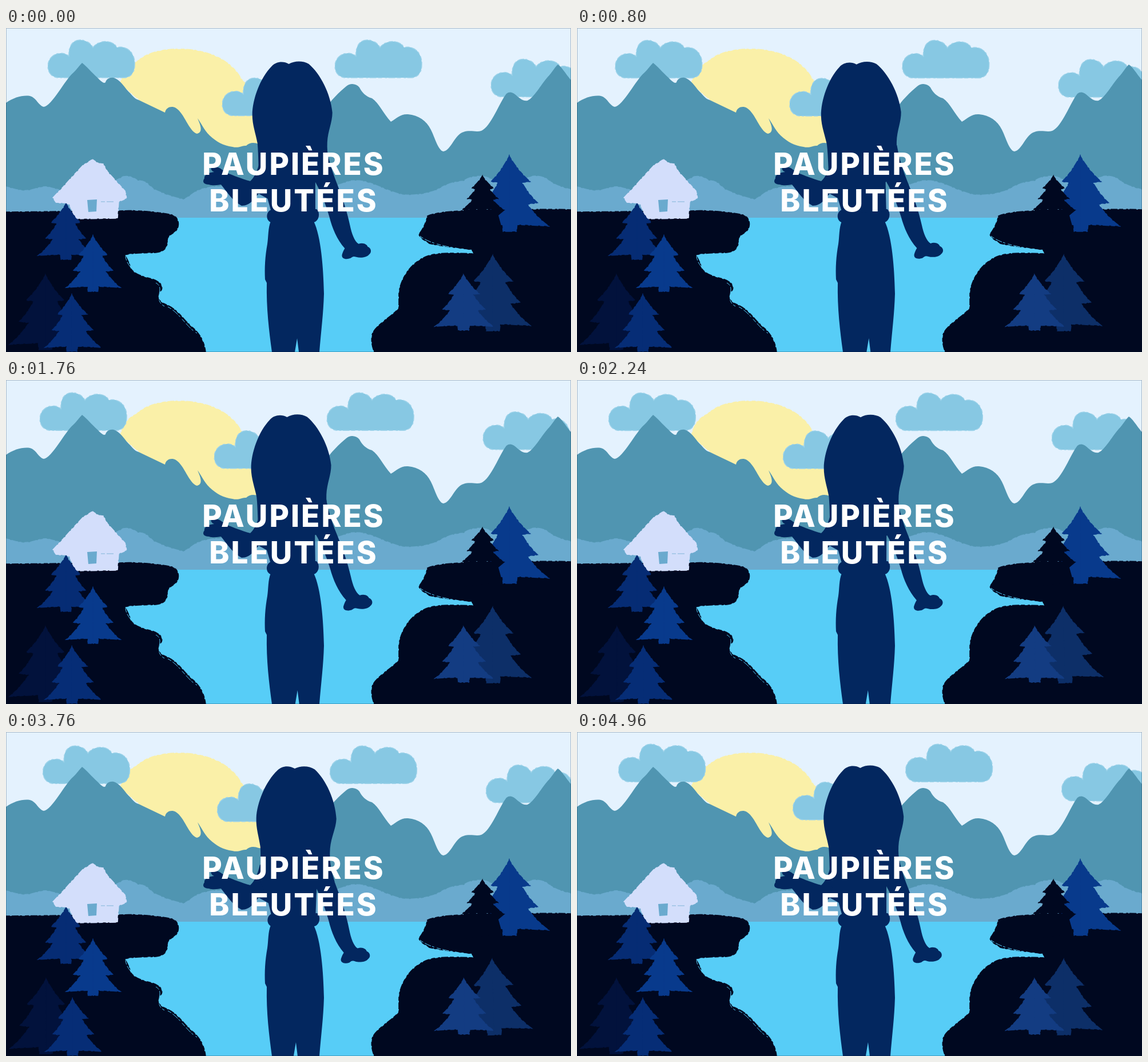
An HTML page with a canvas that plays this animation: 988x567 px, repeating every 5.04 s.

```html
<!DOCTYPE html>
<html lang="fr">
<head>
<meta charset="utf-8">
<title>Paupières bleutées</title>
<style>
html, body { margin: 0; width: 100%; height: 100%; overflow: hidden; background: #e4f2fe; }
canvas { display: block; }
</style>
</head>
<body>
<canvas id="stage" width="988" height="567"></canvas>
<script>
const ctx = document.getElementById('stage').getContext('2d');
const W = 988, H = 567, LOOP = 5040, STEP = 80, TAU = Math.PI * 2;

const color = {
  sky: '#e4f2fe', sun: '#faf0a8', cloud: '#87c8e3', cloudEdge: '#9dd3ea',
  mountain: '#5095b1', shore: '#6aaace', lake: '#57cdf7', land: '#000820',
  house: '#d3defb', woman: '#03275f'
};

const sun = new Path2D('M200 98C203 82 212 66 228 60C242 45 270 37 300 37C330 36 358 44 374 53C391 62 405 76 411 89C430 105 446 140 446 212L340 215Z');

const mountains = new Path2D(
  'M0 131C14 121 30 117 42 119C53 122 57 136 66 138C80 137 104 89 118 78' +
  'C124 72 129 65 133 61C140 66 150 78 160 87C166 93 171 98 174 95C176 87 185 85 191 88' +
  'C203 94 208 106 217 114C224 122 226 124 232 126L278 148C280 138 290 136 297 140' +
  'C312 149 320 181 334 185C346 182 339 168 335 158C341 166 346 178 356 188' +
  'C368 199 380 206 396 208C408 211 412 205 420 206C426 200 434 200 442 203L500 210' +
  'L556 145C567 127 584 111 595 102C602 96 612 97 618 104C622 112 629 120 640 123' +
  'C652 131 660 150 673 164C683 158 690 150 703 151C722 153 735 162 743 178' +
  'C750 192 756 215 765 216C778 214 785 186 800 182C812 178 822 183 831 180' +
  'C848 173 863 130 875 115C880 111 885 112 890 116C896 121 904 129 912 127' +
  'C923 122 935 100 947 86C955 78 960 68 965 64C972 68 982 85 988 91V334H0Z');

const shore = new Path2D(
  'M0 278C14 281 24 286 40 284C55 282 64 274 80 280C115 290 160 285 205 260' +
  'C216 258 224 262 230 267C244 266 250 275 258 282C274 290 295 297 310 300' +
  'C322 296 330 284 346 281C390 270 430 284 480 285C530 287 565 282 600 268' +
  'C632 262 654 282 690 291C715 295 738 289 752 284C768 275 780 269 800 268' +
  'C812 258 838 256 850 266C875 275 904 267 915 261C927 256 945 261 952 269' +
  'C964 277 974 279 988 283V336H0Z');

const leftLand = new Path2D(
  'M0 322L200 320C230 318 278 323 293 328C304 334 304 350 295 357' +
  'C288 362 282 364 282 372C283 388 272 392 262 393C245 394 225 393 208 397' +
  'C212 405 216 411 217 418C222 432 245 436 258 440C272 445 277 455 269 462' +
  'C261 472 270 480 280 484C300 492 310 510 325 523C340 535 347 550 349 567H0Z');

const rightLand = new Path2D(
  'M988 318C950 316 910 318 870 319C830 320 765 317 737 329C733 344 729 352 722 361' +
  'C725 370 735 372 740 377C755 381 790 385 815 388L817 395C790 394 757 392 737 399' +
  'C707 410 689 440 687 465V490C675 505 645 520 640 537C638 550 641 560 644 567H988Z');

const bristles = new Path2D(
  'M209 400C212 420 232 432 250 436M262 446C280 456 255 474 277 487M283 488C302 497 318 526 334 534' +
  'M724 364C738 376 770 384 814 389');

const house = new Path2D(
  'M151 230L162 237L170 238L178 252L188 263L208 285L211 298L197 304L195 333L122 334' +
  'C117 326 115 318 111 309L105 306L88 306L82 297L100 278L118 258L135 240Z');

const cloud = new Path2D(
  'M18 67C-7 65-6 25 23 24C30 24 34 27 37 29C36 10 45 1 56 1C66 1 75 6 79 14' +
  'C88 1 113-1 121 14C140 10 153 25 152 44C152 59 145 67 132 67Z');

const upperBody = new Path2D(
  'M495 63C485 57 472 59 465 67C445 87 431 125 431 152C431 170 437 185 440 202' +
  'C442 225 441 248 443 265L455 290L464 322H541L541 270L572 258C565 238 561 220 562 200' +
  'C563 180 571 165 571 148C568 115 550 80 530 63C520 57 505 57 495 63Z');

const leftArm = new Path2D(
  'M444 232C440 250 434 262 427 268C412 264 398 258 387 254C379 250 376 244 366 243' +
  'C357 242 356 248 364 252C354 253 346 257 347 263C342 270 347 274 355 274C364 277 372 274 376 274' +
  'C386 286 396 303 412 311C428 311 434 298 442 290L460 300V240Z');

const rightArm = new Path2D(
  'M560 205C564 232 571 252 577 268C587 294 596 320 601 345C604 360 609 374 616 378' +
  'C624 375 631 379 632 383C638 385 640 393 634 397C630 402 619 403 612 401' +
  'C606 399 605 401 602 403C594 406 586 404 587 397C589 391 590 389 592 386' +
  'C578 370 570 350 565 330C558 306 550 286 541 270L535 225Z');

const belt = new Path2D('M464 318C454 321 454 337 463 340H538C548 338 550 322 543 317Z');

const legs = new Path2D(
  'M463 338C458 350 459 365 457 378C453 400 452 420 453 440L456 446C455 490 460 530 465 567' +
  'H548C551 530 555 500 556 465C555 420 551 365 538 338Z');

function fill(path, style) {
  ctx.fillStyle = style;
  ctx.fill(path);
}

// Uneven dashes along the outline suggest a dry brush.
function edge(path, style, width = 1.5) {
  ctx.strokeStyle = style;
  ctx.lineWidth = width;
  ctx.setLineDash([7, 3, 12, 2, 4, 5]);
  ctx.stroke(path);
  ctx.setLineDash([]);
}

function brushed(path, style, width) {
  fill(path, style);
  edge(path, style, width);
}

function placed(x, y, angle, draw) {
  ctx.save();
  ctx.translate(x, y);
  ctx.rotate(angle);
  draw();
  ctx.restore();
}

function pivoted(x, y, angle, draw) {
  placed(x, y, angle, () => { ctx.translate(-x, -y); draw(); });
}

// Half outline of a fir: [x, y] as shares of half-width and height.
const fir = [[.53, .34], [.32, .35], [.72, .62], [.46, .64], [1, .93], [.2, .91], [.18, 1]];

function tree(x, y, left, right, height, style) {
  const path = new Path2D();
  const side = width => {
    let px = 0, py = 0;
    path.moveTo(x, y);
    for (const [fx, fy] of fir) {
      const nx = fx * width, ny = fy * height;
      path.quadraticCurveTo(x + px + (nx - px) * .42, y + py + (ny - py) * .58, x + nx, y + ny);
      px = nx; py = ny;
    }
    path.lineTo(x, y + height);
    path.closePath();
  };
  side(-left);
  side(right);
  brushed(path, style);
}

// Linear travel through [time, x, y] stops.
function along(stops, t) {
  const i = stops.findIndex(s => s[0] > t);
  const a = stops[i - 1], b = stops[i], k = (t - a[0]) / (b[0] - a[0]);
  return [a[1] + (b[1] - a[1]) * k, a[2] + (b[2] - a[2]) * k];
}

const drift = [[0, 0, 0], [2270, -18, 1.6], [2960, -13.4, 2.4], [3760, -8.7, 3.2], [LOOP, 0, 0]];
const cloudSpots = [[73, 20], [378, 86.5], [575, 20], [848, 53.5]];

const wave = (t, peak) => Math.cos(TAU * (t - peak) / LOOP);

function breeze(t) {
  const k = (t - 1500) / 3100;
  return k > 0 && k < 1 ? (1 - Math.cos(TAU * k)) / 2 : 0;
}

function drawSky(t) {
  ctx.fillStyle = color.sky;
  ctx.fillRect(0, 0, W, H);
  brushed(sun, color.sun);
  const [dx, dy] = along(drift, t);
  for (const [x, y] of cloudSpots) {
    placed(x + dx, y + dy, 0, () => {
      fill(cloud, color.cloud);
      edge(cloud, color.cloudEdge);
    });
  }
}

function drawLand() {
  fill(mountains, color.mountain);
  brushed(shore, color.shore);
  ctx.fillStyle = color.lake;
  ctx.fillRect(0, 332, W, H - 332);
  brushed(leftLand, color.land);
  brushed(rightLand, color.land);
  edge(bristles, color.lake, 1);
  brushed(house, color.house);
  fill(new Path2D('M142 301L159 300L158 321L144 322Z'), color.shore);
  edge(new Path2D('M166 304H190'), color.shore, .8);
}

function drawTrees(t) {
  const wind = breeze(t);
  tree(880, 224, 60, 69, 132, '#083a8c');
  fill(new Path2D('M800 318H873L861 328L868 353L800 362Z'), color.land);
  tree(833, 259, 36, 38, 64, color.land);
  tree(105, 307, 49, 47, 98, '#062c74');
  tree(152, 364, 47, 48, 97, '#083a8c');
  tree(69 + 2 * wind, 432, 63, 61, 131, '#02123c');
  tree(115 + 2 * wind, 467, 47, 51, 99, '#062d76');
  pivoted(850, 440, -.055 * wind, () => tree(851, 398, 62, 66, 132, '#0d2f68'));
  tree(800 + wind, 432, 50, 52, 97, '#133c82');
}

function drawWoman(t) {
  const sway = 1.2 - 5.8 * wave(t, 1050);
  const bob = 1.2 - 1.2 * wave(t, 0);
  const reach = .9 + 2.2 * wave(t, 1400);
  fill(legs, color.woman);
  placed(-.3 * sway, 0, 0, () => fill(new Path2D('M509 543L505 567H512Z'), color.lake));
  placed(.15 * sway, 0, 0, () => fill(belt, color.woman));
  fill(leftArm, color.woman);
  pivoted(555, 240, -reach / 150, () => fill(rightArm, color.woman));
  pivoted(503, 330, sway / 183, () => {
    ctx.translate(0, bob);
    fill(upperBody, color.woman);
  });
}

function drawTitle() {
  ctx.fillStyle = '#fff';
  ctx.font = '800 53px Inter, "Open Sans", sans-serif';
  ctx.letterSpacing = '3px';
  ctx.textAlign = 'center';
  ctx.textBaseline = 'alphabetic';
  ctx.fillText('PAUPIÈRES', 503, 257);
  ctx.fillText('BLEUTÉES', 503, 321);
}

function drawFrame(now) {
  const t = Math.floor(now % LOOP / STEP) * STEP;
  drawSky(t);
  drawLand();
  drawTrees(t);
  drawWoman(t);
  drawTitle();
  ctx.strokeStyle = 'rgba(0, 20, 50, .25)';
  ctx.lineWidth = 1;
  ctx.strokeRect(.5, .5, W - 1, H - 1);
}

let start;
function tick(now) {
  start ??= now;
  drawFrame(now - start);
  requestAnimationFrame(tick);
}
drawFrame(0);
requestAnimationFrame(tick);
</script>
</body>
</html>
```
